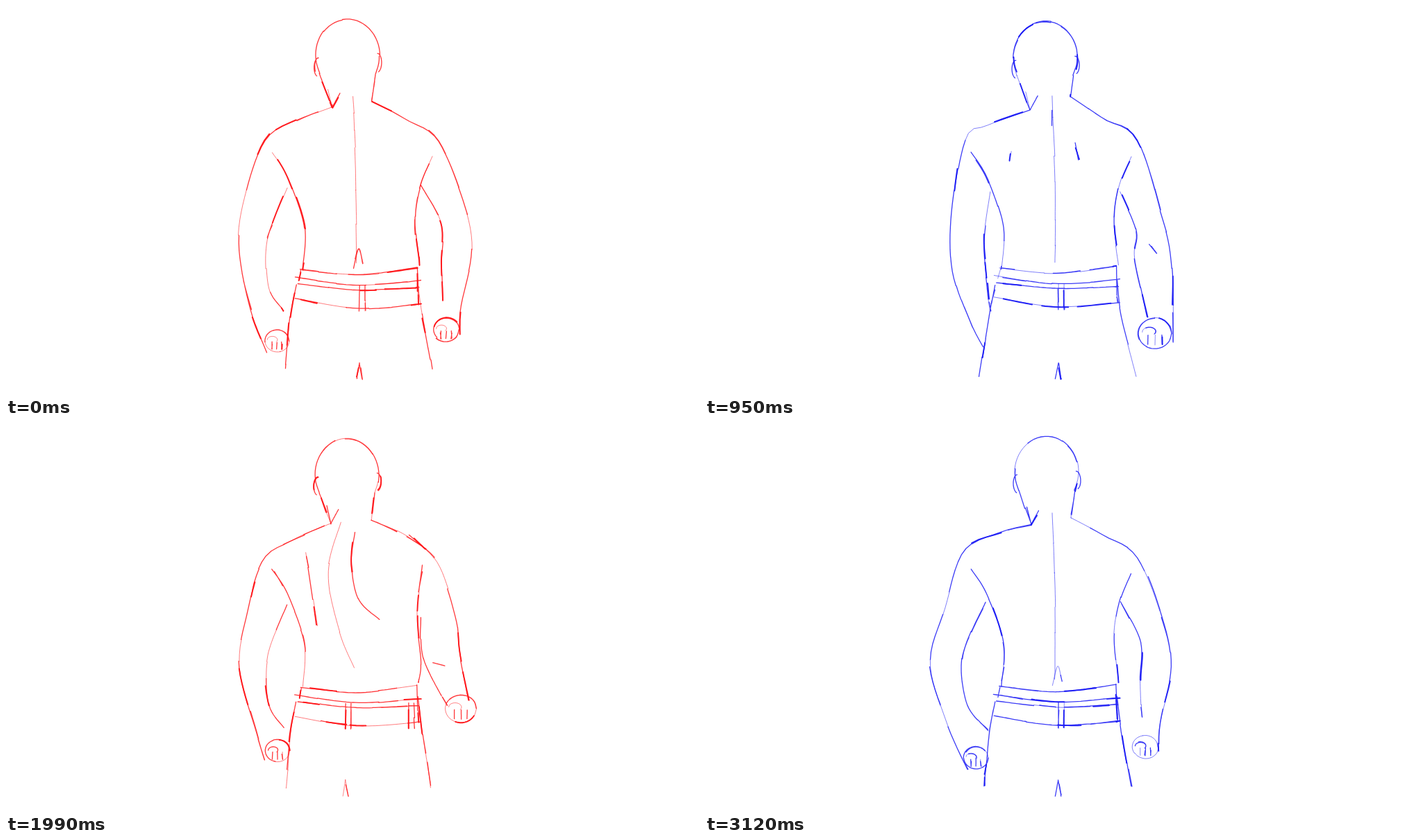
Animation of 998 by 561 pixels, one loop 3200 ms. Source, as an HTML page:

```html
<!DOCTYPE html>
<html lang="en">
<head>
<meta charset="utf-8">
<title>Posing figure</title>
<style>
html, body { margin: 0; width: 100%; height: 100%; overflow: hidden; background: #fff; }
svg { display: block; width: 100%; height: 100%; }
path { fill: none; stroke-linecap: round; stroke-linejoin: round; }
</style>
</head>
<body>
<svg viewBox="0 0 998 561">
  <path stroke-width=".8" opacity=".7"/>
  <path stroke-width="1.3" opacity=".85"/>
  <path stroke-width="1.9" opacity=".95"/>
</svg>
<script>
const LOOP = 3200, SAMPLES = 40;
const RED = '#ff1418', BLUE = '#1a1af5';
const TAU = Math.PI * 2;

// Limbs are a few "x,y" points that a smooth line runs through.
// head: centre; fists: centre, radius (0 is hidden); hips: belt loop x, drop, leg spread.
const rest = {
  head: [492, 72], hips: [513, 0, 0], fistL: [390, 483, 16], fistR: [634, 467, 17],
  outL: '470,146 420,164 374,192 346,268 335,345 353,440 376,500',
  inL: '405,262 377,335 378,405 400,440',
  sideL: '383,211 406,248 430,318 427,380',
  outR: '527,137 575,163 622,193 657,277 671,350 655,435 653,473',
  inR: '598,258 627,315 627,370 629,424',
  sideR: '614,217 597,258 589,310 596,374',
  spine: '500,130 504,250 504,370',
  marks: '500,378 508,350 514,372'
};

const raise = {
  head: [495, 77], hips: [512, -5, 6], fistL: [337, 448, 28], fistR: [704, 450, 24],
  outL: '460,112 408,134 350,170 290,255 288,330 292,420 302,460',
  inL: '405,209 345,282 348,350 332,418',
  sideL: '414,140 406,235 424,315 424,386',
  outR: '530,110 580,139 640,168 705,278 715,350 723,430 732,458',
  inR: '613,237 660,298 662,340 683,422',
  sideR: '597,155 610,240 584,318 589,388',
  spine: '500,124 502,150 502,178',
  marks: '460,110 500,122 540,109/396,213 408,250/613,184 613,237/291,258 323,263/688,293 702,292/425,419 465,432 505,422/517,425 550,436 590,423'
};

const mirror = value => typeof value === 'string'
  ? value.replace(/(\d+),/g, (_, x) => 1000 - x + ',')
  : [1000 - value[0], ...value.slice(1)];
const flexedArm = {
  out: '460,112 385,133 335,128 258,158 222,82',
  in: '405,209 310,226 222,212 178,120 184,84',
  fist: [193, 60, 28]
};
const flex = { ...raise, marks: '460,110 500,122 540,109' };
for (const part in flexedArm) {
  flex[part + 'L'] = flexedArm[part];
  flex[part + 'R'] = mirror(flexedArm[part]);
}

const back = {
  ...rest,
  head: [490, 75], hips: [513, -2, 7], fistL: [395, 480, 0], fistR: [648, 472, 22],
  outL: '468,150 405,173 376,190 356,290 356,380 382,455 400,492',
  inL: '411,268 402,340 407,410 411,440',
  outR: '526,130 575,163 622,193 660,310 672,370 674,440 674,485',
  inR: '598,268 621,325 619,365 637,448',
  marks: '441,210 439,224/533,197 538,222/640,344 650,356/500,150 500,172'
};

const twist = {
  head: [484, 75], hips: [489, 1, -2], fistL: [400, 455, 0], fistR: [654, 360, 14],
  outL: '458,153 410,180 389,200 388,230 345,320 346,375 404,460',
  inL: '412,290 385,340 403,372 412,420',
  sideL: '394,208 413,290 428,322 426,380',
  outR: '525,138 590,165 627,200 633,245 638,330 645,340',
  inR: '595,182 566,285 558,355 600,392 650,388',
  sideR: '592,185 586,230 578,262',
  spine: '520,137 460,165 446,215 470,310 502,374',
  marks: '508,140 487,180 497,258 545,294/418,195 412,225 425,270 450,308/498,258 532,282/636,315 628,347'
};

const settle = {
  ...rest,
  head: [491, 75], hips: [493, 1, -2], fistL: [391, 473, 16], fistR: [655, 412, 20],
  outL: '468,145 410,170 370,198 347,275 336,350 360,445 372,486',
  outR: '526,140 580,165 622,203 647,280 653,330 666,400',
  inR: '597,280 601,340 635,408',
  sideR: '600,205 592,275 598,345 594,374',
  spine: '482,143 464,215 480,300 502,353',
  marks: '502,158 497,205 508,255 538,283/432,187 440,240 448,292/615,346 632,350/580,161 605,182'
};

const lean = {
  head: [551, 69], hips: [514, 2, -6], fistL: [408, 440, 0], fistR: [606, 452, 0],
  outL: '520,138 440,157 386,195 350,275 339,320 360,380 410,446',
  inL: '425,250 383,325 412,380 419,420',
  sideL: '414,188 427,240 432,310 428,385',
  outR: '580,150 635,183 667,210 676,300 666,370 603,457',
  inR: '625,265 635,328 600,415',
  sideR: '654,211 625,268 605,310 592,385',
  spine: '551,140 543,220 516,362',
  marks: '510,398 513,365/430,295 438,337/380,181 440,157/525,440 555,448 588,440'
};

const close = {
  ...rest,
  outL: '470,147 425,158 372,186 345,270 324,345 347,430 378,500',
  inL: '404,258 371,335 377,405 408,443'
};

const lerp = (a, b, u) => Array.isArray(a) ? a.map((v, i) => lerp(v, b[i], u)) : a + (b - a) * u;

// Samples a smooth curve through the points at equal steps of length.
function curve(points) {
  const at = i => points[Math.max(0, Math.min(points.length - 1, i))];
  const dense = [at(0)], run = [0];
  for (let i = 0; i < points.length - 1; i++)
    for (let k = 1; k <= 12; k++) {
      const u = k / 12;
      const p = [0, 1].map(d => {
        const [a, b, c, e] = [-1, 0, 1, 2].map(j => at(i + j)[d]);
        return b + u / 2 * (c - a + u * (2 * a - 5 * b + 4 * c - e + u * (3 * (b - c) + e - a)));
      });
      const last = dense[dense.length - 1];
      run.push(run[run.length - 1] + Math.hypot(p[0] - last[0], p[1] - last[1]));
      dense.push(p);
    }
  let j = 1;
  return Array.from({ length: SAMPLES }, (_, i) => {
    const goal = run[run.length - 1] * i / (SAMPLES - 1);
    while (j < run.length - 1 && run[j] < goal) j++;
    return lerp(dense[j - 1], dense[j], (goal - run[j - 1]) / (run[j] - run[j - 1] || 1));
  });
}

const parse = text => curve(text.split(' ').map(p => p.split(',').map(Number)));

const build = shape => Object.fromEntries(Object.entries(shape).map(([name, value]) => [
  name, name === 'marks' ? value.split('/').map(parse) : Array.isArray(value) ? value : parse(value)
]));

function mix(a, b, u) {
  const pose = {};
  for (const name in a) pose[name] = name === 'marks' ? (u < .5 ? a : b).marks : lerp(a[name], b[name], u);
  return pose;
}

const arc = (x, y, rx, ry, from, to) => curve(Array.from({ length: 13 }, (_, i) => {
  const angle = lerp(from, to, i / 12);
  return [x + rx * Math.cos(angle), y + ry * Math.sin(angle)];
}));

function headLines({ head: [x, y], outL, outR }) {
  const skull = arc(x, y, 46, 53, TAU * .42, TAU * 1.08);
  return [
    skull,
    curve([skull[0], outL[0]]),
    curve([skull[SAMPLES - 1], outR[0]]),
    arc(x - 42, y + 16, 6, 13, TAU * .3, TAU * .75),
    arc(x + 43, y + 10, 6, 13, -TAU * .25, TAU * .2),
    curve([[outL[0][0] - 6, outL[0][1] - 26], outL[0]]),
    curve([[outL[0][0] + 11, outL[0][1] - 20], outL[0]])
  ];
}

function fistLines([x, y, r]) {
  if (r < 5) return [];
  const fingers = [-.45, 0, .45].map(k => curve([[x + k * r, y + r * .1], [x + k * r, y + r * .75]]));
  return [
    arc(x, y, r * 1.1, r, 0, TAU),
    arc(x - r * .4, y - r * .1, r * .45, r * .3, Math.PI, TAU * 1.1),
    ...fingers
  ];
}

function trouserLines([loop, drop, spread]) {
  const sag = (x0, y0, x1, y1, depth) =>
    curve([[x0, y0 + drop], [(x0 + x1) / 2, (y0 + y1) / 2 + depth + drop], [x1, y1 + drop]]);
  const beltLoops = [loop, loop + 91].filter(x => x < 590)
    .flatMap(x => [-4, 4].map(d => curve([[x + d, 403 + drop], [x + d, 440 + drop]])));
  const foot = 523 + Math.abs(spread) * 1.6;
  return [
    sag(424, 380, 592, 377, 9),
    sag(416, 391, 597, 396, 9),
    sag(420, 401, 595, 406, 6),
    sag(416, 422, 598, 430, 10),
    sag(425, 381, 422, 395, 0),
    sag(592, 377, 594, 430, 0),
    ...beltLoops,
    curve([[418, 402], [409, 450], [402 - spread, foot]]),
    curve([[593, 395], [600, 450], [614 + spread, foot]]),
    ...[-4, 4].map(d => curve([[loop - 4, 515], [loop - 4 + d, 538]]))
  ];
}

const [restPose, raisePose, flexPose, backPose, twistPose, settlePose, leanPose, closePose] =
  [rest, raise, flex, back, twist, settle, lean, close].map(build);
const swingPose = {
  ...mix(backPose, twistPose, .45),
  ...build({
    outR: '522,137 575,160 630,200 672,290 702,370',
    inR: '600,265 640,340 685,402',
    fistR: [703, 392, 15]
  })
};

const KEYS = [
  [0, restPose], [400, raisePose], [560, mix(raisePose, flexPose, .92)], [690, flexPose],
  [820, raisePose], [950, backPose], [1430, swingPose], [1670, twistPose], [1990, settlePose],
  [2230, restPose], [2490, leanPose], [2910, mix(closePose, raisePose, .3)],
  [3120, closePose], [LOOP, restPose]
];
const RED_TIMES = [0, 240, 690, 1190, 1430, 1670, 1990, 2230, 2490, 2780];
const LONG_HOLDS = [560, 690, 820, 2230, 2360, 2490, 2780, 2910];

const starts = [];
for (let t = 0; t < LOOP; t += LONG_HOLDS.includes(t) ? 130 : 80) starts.push(t);

function poseAt(time) {
  const i = KEYS.findIndex(([t]) => t > time);
  const [t0, a] = KEYS[i - 1], [t1, b] = KEYS[i];
  const u = (time - t0) / (t1 - t0);
  return u ? mix(a, b, u * u * (3 - 2 * u)) : a;
}

function randomFrom(seed) {
  return () => (seed = (seed * 16807 + 11) % 2147483647) / 2147483647;
}

// Breaks a line into short pencil strokes that drift off it; some are gone over again.
function sketch(points, random, layers, light) {
  const step = Math.hypot(points[1][0] - points[0][0], points[1][1] - points[0][1]) || 1;
  const stroke = (from, to, layer, spread) => {
    const drift = () => [random() - .5, random() - .5].map(v => v * spread);
    const start = drift(), end = drift();
    layers[layer] += 'M' + points.slice(from, to + 1).map((p, i) => {
      const d = lerp(start, end, i / (to - from));
      return p.map((v, k) => (v + d[k]).toFixed(1)).join(' ');
    }).join('L');
  };
  for (let i = 0; i < SAMPLES - 1;) {
    const end = Math.min(SAMPLES - 1, i + Math.ceil((20 + random() * 40) / step));
    stroke(i, end, light || random() < .3 ? 0 : 1, 1.2);
    if (!light && random() < .5) stroke(lerp(i, end, .3) | 0, end, random() < .5 ? 2 : 1, 2);
    i = end;
  }
}

function draw(time, index) {
  const pose = poseAt(time), random = randomFrom(index * 7919 + 101), layers = ['', '', ''];
  const limbs = ['out', 'in', 'side'].flatMap(part => [pose[part + 'L'], pose[part + 'R']]);
  const lines = [...limbs, ...headLines(pose), ...trouserLines(pose.hips), ...pose.marks];
  lines.forEach(line => sketch(line, random, layers));
  [...fistLines(pose.fistL), ...fistLines(pose.fistR), pose.spine]
    .forEach(line => sketch(line, random, layers, line === pose.spine));
  return { layers, color: RED_TIMES.includes(time) ? RED : BLUE };
}

const drawings = starts.map(draw);
const svg = document.querySelector('svg'), paths = svg.querySelectorAll('path');
let shown = -1;

function render(now) {
  const time = now % LOOP;
  const index = starts.filter(t => t <= time).length - 1;
  if (index === shown) return;
  shown = index;
  svg.setAttribute('stroke', drawings[index].color);
  paths.forEach((path, i) => path.setAttribute('d', drawings[index].layers[i]));
}

const began = performance.now();
function tick() {
  render(performance.now() - began);
  requestAnimationFrame(tick);
}
tick();
</script>
</body>
</html>
```
